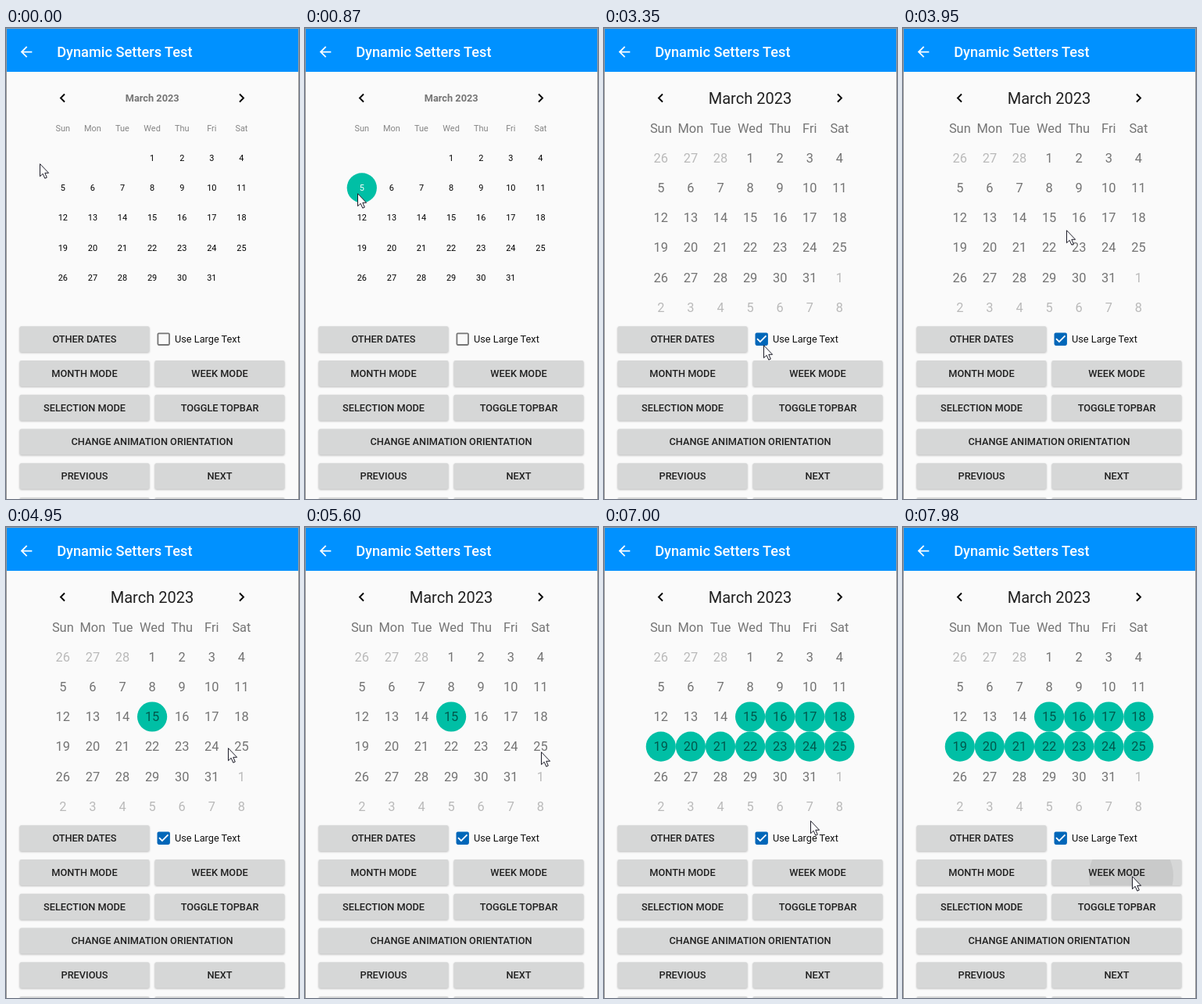
An HTML page for the animation above (8000 ms loop, 375 by 602 pixels).

```html
<!DOCTYPE html>
<html lang="en">
<head>
<meta charset="utf-8">
<title>Dynamic Setters Test</title>
<style>
  html, body { margin: 0; height: 100%; overflow: hidden; background: #fafafa; }
  svg { display: block; width: 375px; height: 602px; font-family: Roboto, sans-serif; }
  .btn { fill: #d6d7d7; filter: drop-shadow(0 1px 1px rgba(0,0,0,.25)); }
</style>
</head>
<body>
<svg viewBox="0 0 375 602">
  <defs><clipPath id="weekClip"><rect x="190.5" y="425.1" width="166" height="33" rx="2"/></clipPath></defs>
  <rect width="375" height="602" fill="#fafafa"/>
  <rect width="375" height="56" fill="#0091ff"/>
  <path d="M20 11H7.83l5.59-5.59L12 4l-8 8 8 8 1.41-1.41L7.83 13H20z" fill="#fff" transform="translate(15.1 19.6) scale(.9115)"/>
  <path d="M75 84.5l-5 5 5 5M299 84.5l5 5-5 5" fill="none" stroke="#000" stroke-width="1.9"/>
  <g id="calendar"></g>
  <g id="buttons"></g>
  <circle id="ripple" fill="rgba(0,0,0,.06)" cx="292" cy="446" r="0" clip-path="url(#weekClip)"/>
  <g id="labels"></g>
  <rect id="box" x="194.4" y="390.4" width="14.6" height="14.6" rx="1.2" stroke-width="1.8"/>
  <path id="tick" d="M10 17l-5-5 1.41-1.41L10 14.17l7.59-7.59L19 8z" fill="#fff" transform="translate(190.8 386.8) scale(.9115)"/>
  <path d="M.5 602V.5H374.5V602" fill="none" stroke="#9a9a9a"/>
  <path id="cursor" d="M.5 .7V16.7L4.2 13.3 6.8 19.2 9.3 18.1 6.8 12.3H11.6Z" fill="#fff" stroke="#1c1c28"/>
</svg>
<script>
const $ = id => document.getElementById(id);
const SP = 0.9115, LOOP = 8000, STEP = 120;

function text(str, x, cy, sp, fill, weight = 400, anchor = 'middle') {
  const size = sp * SP;
  return `<text x="${x}" y="${cy + size * 0.356}" font-size="${size}" font-weight="${weight}" fill="${fill}" text-anchor="${anchor}">${str}</text>`;
}

// Static controls
const rowY = i => 397.7 + 43.75 * i;
const buttons = [
  [0, 'L', 'OTHER DATES'], [1, 'L', 'MONTH MODE'], [1, 'R', 'WEEK MODE'],
  [2, 'L', 'SELECTION MODE'], [2, 'R', 'TOGGLE TOPBAR'],
  [3, 'W', 'CHANGE ANIMATION ORIENTATION'],
  [4, 'L', 'PREVIOUS'], [4, 'R', 'NEXT'], [5, 'L', ''], [5, 'R', '']
];
let rects = '';
let labels = text('Dynamic Setters Test', 65.2, 31, 20, '#fff', 500, 'start') +
  text('Use Large Text', 216, 397.7, 14, '#111', 400, 'start');
for (const [row, side, label] of buttons) {
  const x = side === 'R' ? 190.5 : 17.5, w = side === 'W' ? 339 : 166;
  rects += `<rect class="btn" x="${x}" y="${rowY(row) - 16.4}" width="${w}" height="33" rx="2"/>`;
  labels += text(label, x + w / 2, rowY(row), 14, '#212121', 500);
}
$('buttons').innerHTML = rects;
$('labels').innerHTML = labels;

// Month grid; days first..last are selected
function calendar(big, first, last) {
  const sp = big ? 18 : 12;
  const grey = 'rgba(0,0,0,.54)';
  let out = big ? text('March 2023', 187, 90, 22, '#212121')
                : text('March 2023', 187.2, 89.7, 14, '#757575', 700);
  ['Sun', 'Mon', 'Tue', 'Wed', 'Thu', 'Fri', 'Sat'].forEach((name, i) => {
    out += text(name, 72.8 + 38.1 * i, 128.2, sp, big ? '#757575' : '#858585');
  });
  for (let i = 0; i < 42; i++) {
    const day = i - 2, inside = day >= 1 && day <= 31;
    if (!inside && !big) continue;
    const x = 72.8 + 38.1 * (i % 7), y = 166.2 + 38.15 * Math.floor(i / 7);
    const on = day >= first && day <= last;
    if (on) out += `<circle cx="${x}" cy="${y}" r="19.1" fill="#00bfa5"/>`;
    const fill = !inside ? 'rgba(0,0,0,.26)' : big ? grey : on ? '#fff' : '#000';
    out += text(day < 1 ? day + 28 : day > 31 ? day - 31 : day, x, y, sp, fill);
  }
  return out;
}

// Pointer moves: start time, number of steps, end point
const moves = [
  [140, 2, 67, 211], [380, 2, 151, 307], [750, 2, 67, 211], [990, 2, 72, 211],
  [1610, 6, 204, 405], [3470, 5, 209, 258], [4070, 1, 193, 241], [4190, 1, 191, 241],
  [4690, 1, 231, 266], [4830, 2, 284, 282], [5090, 2, 302, 282], [5360, 3, 302, 287],
  [6760, 3, 264, 375], [7120, 3, 297, 444], [7860, 2, 293, 446]
];
function pointer(t) {
  let x = 43, y = 173;
  for (const [start, n, toX, toY] of moves) {
    if (t < start) break;
    const k = Math.min(1, (Math.floor((t - start) / STEP) + 1) / n);
    const e = k * k * (3 - 2 * k);
    x += (toX - x) * e;
    y += (toY - y) * e;
  }
  return [x, y];
}

function selection(t) {
  if (t >= 5980) return [15, 25];
  if (t >= 4570) return [15, 15];
  return t >= 260 && t < 1360 ? [5, 5] : [0, -1];
}

let shown = '';
function draw(now) {
  const t = now % LOOP, big = t >= 3350, [first, last] = selection(t);
  const key = [big, first, last].join();
  if (key !== shown) {
    shown = key;
    $('calendar').innerHTML = calendar(big, first, last);
    $('box').setAttribute('fill', big ? '#0067b9' : 'none');
    $('box').setAttribute('stroke', big ? '#0067b9' : '#757575');
    $('tick').setAttribute('visibility', big ? 'visible' : 'hidden');
  }
  $('ripple').setAttribute('r', t >= 7980 ? 54 : t >= 7860 ? 22 : 0);
  $('cursor').setAttribute('transform', `translate(${pointer(t).map(Math.round)})`);
}

const begin = performance.now();
function tick() {
  draw(performance.now() - begin);
  requestAnimationFrame(tick);
}
tick();
</script>
</body>
</html>
```
